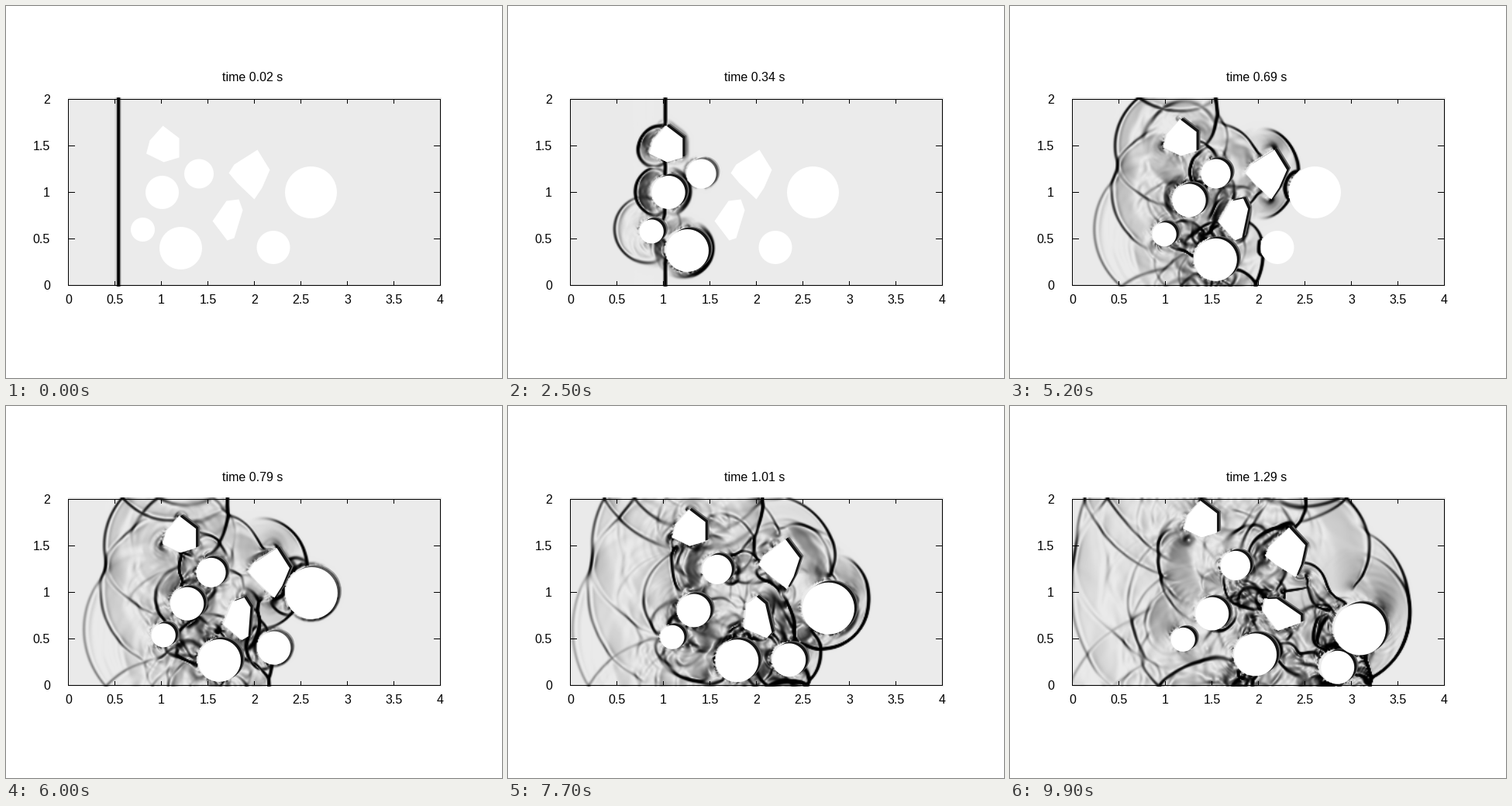
Write a matplotlib script that moves like this. It is 640 px wide and 480 px high and loops after 10000 ms.

```python
import numpy as np
import matplotlib.pyplot as plt
from matplotlib.animation import FuncAnimation
from matplotlib.patches import Polygon, Rectangle

# A shock wave hits drifting rigid bodies; the picture shades the pressure gradient.
FRAMES, T0, DT, SUB = 100, 0.02, 0.01283, 4
NX, NY = 360, 180
LEFT, RIGHT, TOP, BOTTOM = 80, 562, 118.5, 362.5
UNIT = 120  # pixels per length unit
GAMMA, SOUND, MACH = 1.4, 1.08, 1.39
RAMP = 0.08  # seconds a kick takes to act

DX = (RIGHT - LEFT) / NX / UNIT
DY = (BOTTOM - TOP) / NY / UNIT
X = (LEFT + (np.arange(NX) + 0.5) * DX * UNIT).astype(np.float32)[None, :]
Y = (TOP + (np.arange(NY) + 0.5) * DY * UNIT).astype(np.float32)[:, None]


def shock_states():
    """Density, velocities and pressure behind and ahead of the shock."""
    m2, p0 = MACH ** 2, SOUND ** 2 / GAMMA
    rho = (GAMMA + 1) * m2 / ((GAMMA - 1) * m2 + 2)
    u = 2 * SOUND / (GAMMA + 1) * (MACH - 1 / MACH)
    p = p0 * (1 + 2 * GAMMA / (GAMMA + 1) * (m2 - 1))
    return (rho, u, 0, p), (1, 0, 0, p0)


class Body:
    """A disc (radius) or convex polygon; each kick (t, vx, vy, spin) adds speed."""

    def __init__(self, shape, start, *kicks):
        self.radius = shape if np.isscalar(shape) else None
        if self.radius:
            a = np.linspace(0, 2 * np.pi, 48, endpoint=False)
            shape = self.radius * np.column_stack([np.cos(a), np.sin(a)])
        self.shape = np.array(shape, float)
        self.start = np.array([*start, 0.0])
        self.kicks = [(k[0], np.array([*k[1:], 0.0][:3])) for k in kicks]
        self.hit = kicks[0][0]

    def pose(self, t):
        pose = self.start.copy()
        for t0, speed in self.kicks:
            s = max(t - t0 + RAMP / 2, 0)
            pose += speed * (s * s / (2 * RAMP) if s < RAMP else s - RAMP / 2)
        return pose

    def points(self, t):
        x, y, a = self.pose(t)
        c, s = np.cos(a), np.sin(a)
        px, py = self.shape.T
        return np.column_stack([x + px * c + py * s, y - px * s + py * c])

    def inside(self, t):
        if self.radius:
            x, y, _ = self.pose(t)
            return (X - x) ** 2 + (Y - y) ** 2 < self.radius ** 2
        mask = np.ones((NY, NX), bool)
        pts = self.points(t)
        for (ax, ay), (bx, by) in zip(pts, np.roll(pts, -1, axis=0)):
            mask &= (bx - ax) * (Y - ay) - (by - ay) * (X - ax) > 0
        return mask

    def velocity(self, t):
        (x, y, _), (vx, vy, w) = self.pose(t), (self.pose(t + 1e-3) - self.pose(t)) / 1e-3
        return (vx + w * (Y - y)) / UNIT, (vy - w * (X - x)) / UNIT


bodies = [
    Body([(0, -24), (21, -8), (21, 17), (1, 23), (-21.5, 12), (-17, -5)], (202, 178),
         (0.3, 44, 0), (0.48, 0, -39.5)),
    Body(19, (248.5, 216), (0.35, 90, 0), (0.55, -100, 0), (0.7, 0, -18), (0.92, 85, 0)),
    Body(21.5, (201, 240), (0.27, 80, 0), (0.44, 0, 42), (0.62, -55, 0), (1.0, 50, -28)),
    Body(15.5, (176, 288), (0.12, 40, 11)),
    Body(27.5, (225, 312), (0.28, 98, 50), (0.55, 0, -40), (0.96, -24, -38)),
    Body([(-2, -25), (14, -27), (19, -13), (8, 23), (-1, 26), (-20, 1)], (286, 276),
         (0.62, 0, 0, 1.3), (0.66, 102, 0), (1.0, 0, -20, 1.35)),
    Body([(10, -31), (26, -5), (16, 18), (6, 33), (-16, 12), (-27, -1), (-20, -12)],
         (314, 216), (0.49, 85, 0), (0.75, 0, -50, 0.36), (0.89, -65, 0)),
    Body(33.5, (393, 240), (0.79, 85, 95), (0.98, 50, 0)),
    Body(21.5, (344.5, 311), (0.79, 80, 75), (1.03, 145, -45)),
]


def bounce(src, dst, face, wall):
    m = src[:, face]
    m[1] = 2 * wall[face] - m[1]
    dst[:, face] = m


def flux(L, R):
    """HLLC flux between left and right primitive states."""
    cl, cr = np.sqrt(GAMMA * L[3] / L[0]), np.sqrt(GAMMA * R[3] / R[0])
    sl = np.minimum(L[1] - cl, R[1] - cr)
    sr = np.maximum(L[1] + cl, R[1] + cr)
    ml, mr = L[0] * (sl - L[1]), R[0] * (sr - R[1])
    sm = (R[3] - L[3] + ml * L[1] - mr * R[1]) / (ml - mr)
    left = sm > 0
    r, u, v, p = np.where(left, L, R)
    sk = np.where(left, sl, sr)
    s = np.where(left, np.minimum(sl, 0), np.maximum(sr, 0))
    e = p / (GAMMA - 1) + 0.5 * r * (u * u + v * v)
    rs = r * (sk - u) / (sk - sm)
    es = rs * (e / r + (sm - u) * (sm + p / (r * (sk - u))))
    ru = r * u
    return np.stack([ru + s * (rs - r),
                     ru * u + p + s * (rs * sm - ru),
                     ru * v + s * v * (rs - r),
                     u * (e + p) + s * (es - e)])


def sweep(W, solid, wall, k, closed):
    """One MUSCL-Hancock step along the last axis."""
    mode = "symmetric" if closed else "edge"
    P = np.pad(W, ((0, 0), (0, 0), (2, 2)), mode)
    S = np.pad(solid, ((0, 0), (2, 2)), mode)
    V = np.pad(wall, ((0, 0), (1, 1)), mode)
    if closed:
        P[1, :, :2] *= -1
        P[1, :, -2:] *= -1
    d = np.diff(P)
    a, b = d[..., :-1], d[..., 1:]
    ab = a * b
    ok = (ab > 0) & ~(S[:, :-2] | S[:, 1:-1] | S[:, 2:])
    g = np.where(ok, 2 * ab / np.where(ok, a + b, 1), 0)
    C = P[..., 1:-1]
    r, u, _, p = C
    H = C - 0.5 * k * np.stack([u * g[0] + r * g[1], u * g[1] + g[3] / r,
                                u * g[2], u * g[3] + GAMMA * p * g[1]])
    g *= 0.5
    L, R = (H + g)[..., :-1], (H - g)[..., 1:]
    sa, sb = S[:, 1:-2], S[:, 2:-1]
    bounce(L, R, sb & ~sa, V[:, 1:])
    bounce(R, L, sa & ~sb, V[:, :-1])
    dF = k * np.diff(flux(L, R))

    r, u, v, p = W
    e = p / (GAMMA - 1) + 0.5 * r * (u * u + v * v)
    rn = np.clip(r - dF[0], 0.1, 8)
    un = np.clip((r * u - dF[1]) / rn, -2, 2)
    vn = np.clip((r * v - dF[2]) / rn, -2, 2)
    pn = np.clip((GAMMA - 1) * (e - dF[3] - 0.5 * rn * (un * un + vn * vn)), 0.1, 8)
    return np.where(solid, W, np.stack([rn, un, vn, pn]))


def sweep_y(W, solid, wall, k):
    out = sweep(W[[0, 2, 1, 3]].transpose(0, 2, 1), solid.T, wall.T, k, True)
    return out[[0, 2, 1, 3]].transpose(0, 2, 1)


def fill_rim(W, solid):
    """Give solid cells at the rim the mean of their fluid neighbours."""
    fluid = (~solid).astype(np.float32)
    total, count = np.zeros_like(W), np.zeros_like(fluid)
    WF = W * fluid
    for i in (-1, 0, 1):
        for j in (-1, 0, 1):
            total += np.roll(WF, (i, j), (1, 2))
            count += np.roll(fluid, (i, j), (0, 1))
    rim = solid & (count > 0)
    W[:, rim] = total[:, rim] / count[rim]


def shade(W, solid):
    gy, gx = np.gradient(W[3], DY, DX)
    g = np.where(solid, 0, np.hypot(gx, gy))
    return (235 * np.exp(-(g / 8) ** 1.4)).astype(np.uint8)


def simulate():
    W = np.empty((4, NY, NX), np.float32)
    for q, behind, ahead in zip(W, *shock_states()):
        q[:] = np.where(X < 142, behind, ahead)
    shots, t = [], 0.0
    for i in range(FRAMES):
        end = T0 + i * DT
        solid = np.zeros((NY, NX), bool)
        ub, vb = np.zeros((2, NY, NX), np.float32)
        for body in bodies:
            mask = body.inside(t)
            solid |= mask
            for field, v in zip((ub, vb), body.velocity(t)):
                field[mask] = np.broadcast_to(v, mask.shape)[mask]
        steps = SUB if i else 6
        dt = (end - t) / steps
        for step in range(steps):
            # Only columns that are already disturbed need work.
            busy = (np.abs(W[0] - 1) > 1e-4) | (ub != 0) | (vb != 0)
            n = min(NX, np.flatnonzero(busy.any(axis=0))[-1] + 10)
            w, s = W[..., :n], solid[:, :n]
            if step % 2:
                w = sweep_y(w, s, vb[:, :n], dt / DY)
                w = sweep(w, s, ub[:, :n], dt / DX, False)
            else:
                w = sweep(w, s, ub[:, :n], dt / DX, False)
                w = sweep_y(w, s, vb[:, :n], dt / DY)
            W[..., :n] = w
        fill_rim(W, solid)
        shots.append(shade(W, solid))
        t = end
    return shots


shots = simulate()

plt.rcParams["font.family"] = "Liberation Sans"
fig = plt.figure(figsize=(6.4, 4.8), dpi=100, facecolor="white")
ax = fig.add_axes([0, 0, 1, 1])
ax.axis("off")
image = ax.imshow(shots[0], cmap="gray", vmin=0, vmax=255, interpolation="bilinear",
                  extent=(LEFT, RIGHT, BOTTOM, TOP), aspect="auto")
ax.set(xlim=(0, 640), ylim=(480, 0))
window = Rectangle((LEFT, TOP), RIGHT - LEFT, BOTTOM - TOP, transform=ax.transData)


def patch(color, z):
    p = ax.add_patch(Polygon([(0, 0), (1, 0), (0, 1)], fc=color, ec="none", zorder=z))
    p.set_clip_path(window)
    return p


# Each moving body drags a dark rim on its upper right side.
rims = [[(patch("0.4", 2), (5, -3)), (patch("0.08", 2.1), (3.2, -2))] for _ in bodies]
whites = [patch("white", 3) for _ in bodies]


def line(x, y):
    ax.plot(x, y, color="black", lw=0.72, snap=False, solid_capstyle="projecting",
            solid_joinstyle="miter", zorder=4)


def label(x, y, text, ha):
    return ax.text(x, y, text, fontsize=11.52, ha=ha, va="baseline")


line([80.5, 560.5, 560.5, 80.5, 80.5], [120.5, 120.5, 360.5, 360.5, 120.5])
for v in np.arange(0, 4.5, 0.5):
    x = 80.5 + UNIT * v
    line([x, x], [360.5, 355.5])
    line([x, x], [120.5, 125.5])
    label(x, 384.5, f"{v:g}", "center")
for v in np.arange(0, 2.5, 0.5):
    y = 360.5 - UNIT * v
    line([80.5, 88.5], [y, y])
    line([560.5, 552.5], [y, y])
    label(57, y + 5, f"{v:g}", "right")
title = label(318, 97, "", "center")


def draw(i):
    t = T0 + i * DT
    image.set_data(shots[i])
    title.set_text(f"time {t:.2f} s")
    for body, rim, white in zip(bodies, rims, whites):
        pts = body.points(t) + 0.5
        white.set_xy(pts)
        for p, shift in rim:
            p.set_xy(pts + shift)
            p.set_alpha(float(np.clip((t - body.hit) / RAMP + 0.5, 0, 1)))
    return [image, title, *whites]


anim = FuncAnimation(fig, draw, frames=FRAMES, interval=100, repeat=True)
plt.show()
```
